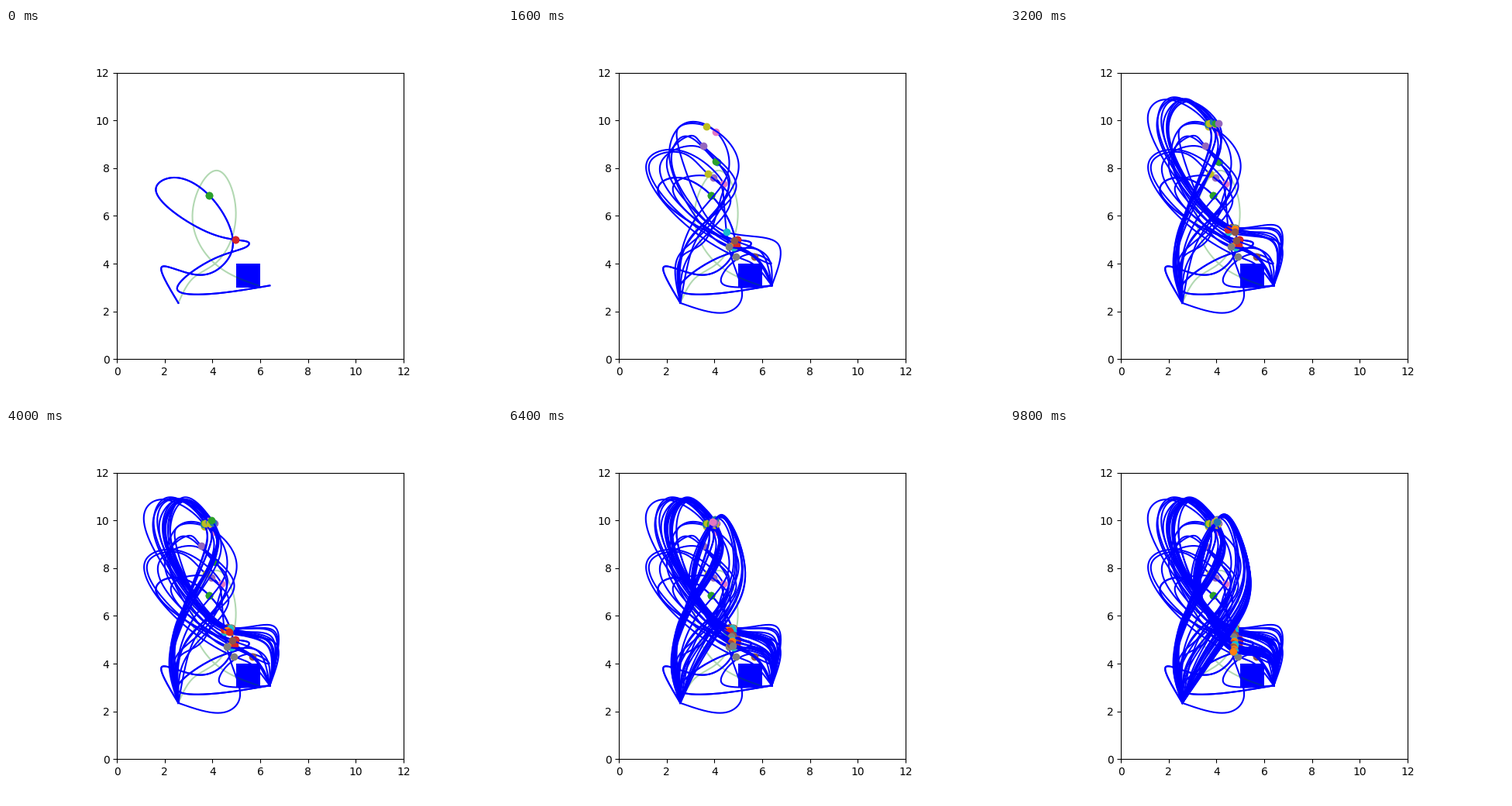
These frames come from a looping animation (640x480 px, 10 s). A matplotlib script:

```python
import numpy as np
import matplotlib.pyplot as plt
from matplotlib.animation import FuncAnimation
from matplotlib.patches import Rectangle

FRAMES, STEP = 50, 200
START, END = (2.57, 2.35), (6.4, 3.08)

GUIDE = [START, (3.2, 3.4), (4.2, 4.08), (4.98, 6.2), (4.18, 7.9),
         (3.17, 6.2), (4.1, 4.0), (5.95, 3.07)]

# The two opening trials wander: inner knots, with the waypoints' positions.
WANDER = [
    (6, 10, [(1.85, 3.78), (1.97, 3.89), (3.35, 3.53), (4.4, 3.9), (4.86, 4.9),
             (3.87, 6.85), (2.3, 7.6), (1.63, 7.08), (3.47, 5.47), (4.97, 5.0),
             (5.53, 4.87), (5.45, 4.72), (4.1, 4.22), (2.52, 2.95), (3.5, 2.71)]),
    (5, 8, [(4.5, 1.96), (5.15, 2.6), (4.7, 4.3), (4.4, 6.6), (3.95, 7.6),
            (2.3, 7.3), (3.5, 5.6), (5.68, 4.28), (6.38, 4.0), (5.5, 4.4),
            (4.27, 3.3), (4.8, 3.02)]),
]

# first trial, easing rate, noise, then the first and last shape of a phase:
# low, waist, right, top, left, waypoint 1, waypoint 2, corner
PHASES = [
    (2, 0.3, 0.17,
     [(2.5, 3.9), (3.4, 5.1), (4.4, 6.7), (2.7, 8.5), (1.5, 7.9),
      (4.05, 7.6), (4.95, 4.4), (5.7, 3.8)],
     [(2.42, 4.1), (3.2, 5.7), (4.9, 7.9), (2.9, 9.8), (2.3, 8.9),
      (3.72, 9.6), (4.6, 5.15), (6.2, 4.6)]),
    (9, 3.5, 0.08,
     [(2.25, 3.7), (2.55, 5.8), (3.6, 8.6), (1.95, 10.88), (1.15, 10.2),
      (3.6, 9.92), (4.75, 5.55), (6.7, 5.55)],
     [(2.35, 3.8), (2.7, 5.8), (4.2, 8.6), (2.9, 10.85), (2.25, 9.7),
      (4.03, 9.92), (4.68, 5.4), (6.35, 4.8)]),
    (25, 4, 0.06,
     [(2.6, 3.8), (3.6, 5.6), (4.85, 8.2), (4.3, 10.12), (3.0, 7.6),
      (3.95, 9.95), (4.72, 5.35), (6.3, 4.6)],
     [(3.55, 3.8), (4.75, 5.5), (5.43, 7.5), (4.45, 10.19), (3.3, 7.4),
      (4.0, 9.95), (4.72, 4.52), (6.15, 4.2)]),
]
STARTS = [phase[0] for phase in PHASES] + [FRAMES]


def spline(knots, n=24):
    """Natural cubic spline with centripetal spacing."""
    p = np.array(knots, float)
    h = np.sqrt(np.hypot(*np.diff(p, axis=0).T))
    t = np.r_[0, np.cumsum(h)]
    slope = np.diff(p, axis=0) / h[:, None]
    a = np.eye(len(p))
    b = np.zeros_like(p)
    for k in range(1, len(p) - 1):
        a[k, k - 1:k + 2] = h[k - 1], 2 * (h[k - 1] + h[k]), h[k]
        b[k] = 6 * (slope[k] - slope[k - 1])
    m = np.linalg.solve(a, b)
    u = np.linspace(0, t[-1], n * len(p))
    k = np.clip(np.searchsorted(t, u, side="right") - 1, 0, len(h) - 1)
    d, e, w = (u - t[k])[:, None], (t[k + 1] - u)[:, None], h[k][:, None]
    return ((m[k] * e**3 + m[k + 1] * d**3) / (6 * w)
            + (p[k] / w - m[k] * w / 6) * e
            + (p[k + 1] / w - m[k + 1] * w / 6) * d)


def trial(i):
    """Knots and the two waypoints of trial i."""
    if i < len(WANDER):
        a, b, inner = WANDER[i]
        return [START, *inner, END], (inner[a - 1], inner[b - 1])
    phase = np.searchsorted(STARTS, i, side="right") - 1
    first, rate, noise, begin, end = PHASES[phase]
    u = (i - first) / (STARTS[phase + 1] - 1 - first)
    s = np.expm1(-rate * u) / np.expm1(-rate)
    begin, end = np.array(begin), np.array(end)
    rng = np.random.default_rng(100 + i)
    shape = begin + (end - begin) * s
    shape += rng.normal(0, noise * (1 - 0.7 * s * (phase == 2)), shape.shape)
    low, waist, right, top, left, w1, w2, corner = shape
    # the loop runs over its crest from right to left
    crest = sorted((w1, top), key=lambda p: -p[0])
    down = left + (w2 - left) * (0.36, 0.6)
    return [START, low, waist, right, *crest, left, down, w2, corner, END], (w1, w2)


fig, ax = plt.subplots(figsize=(6.4, 4.8), dpi=100)
ax.set_aspect("equal")
ax.set(xlim=(0, 12), ylim=(0, 12), xticks=range(0, 13, 2), yticks=range(0, 13, 2))
ax.add_patch(Rectangle((5, 3), 1, 1, color="blue", lw=0))
ax.plot(*spline(GUIDE).T, color="green", alpha=0.3)

layers = []
for i in [0, *range(FRAMES)]:  # the opening trial is drawn twice
    knots, waypoints = trial(i)
    layers.append((i, ax.plot(*spline(knots).T, color="blue")))
    for j, point in enumerate(waypoints):
        layers.append((i, ax.plot(*point, "o", color=f"C{(2 + 2 * i + j) % 10}")))


def draw(frame):
    for i, (artist,) in layers:
        artist.set_visible(i <= frame)
    return []


anim = FuncAnimation(fig, draw, frames=FRAMES, interval=STEP, repeat=True,
                     repeat_delay=0, blit=False)
plt.show()
```
